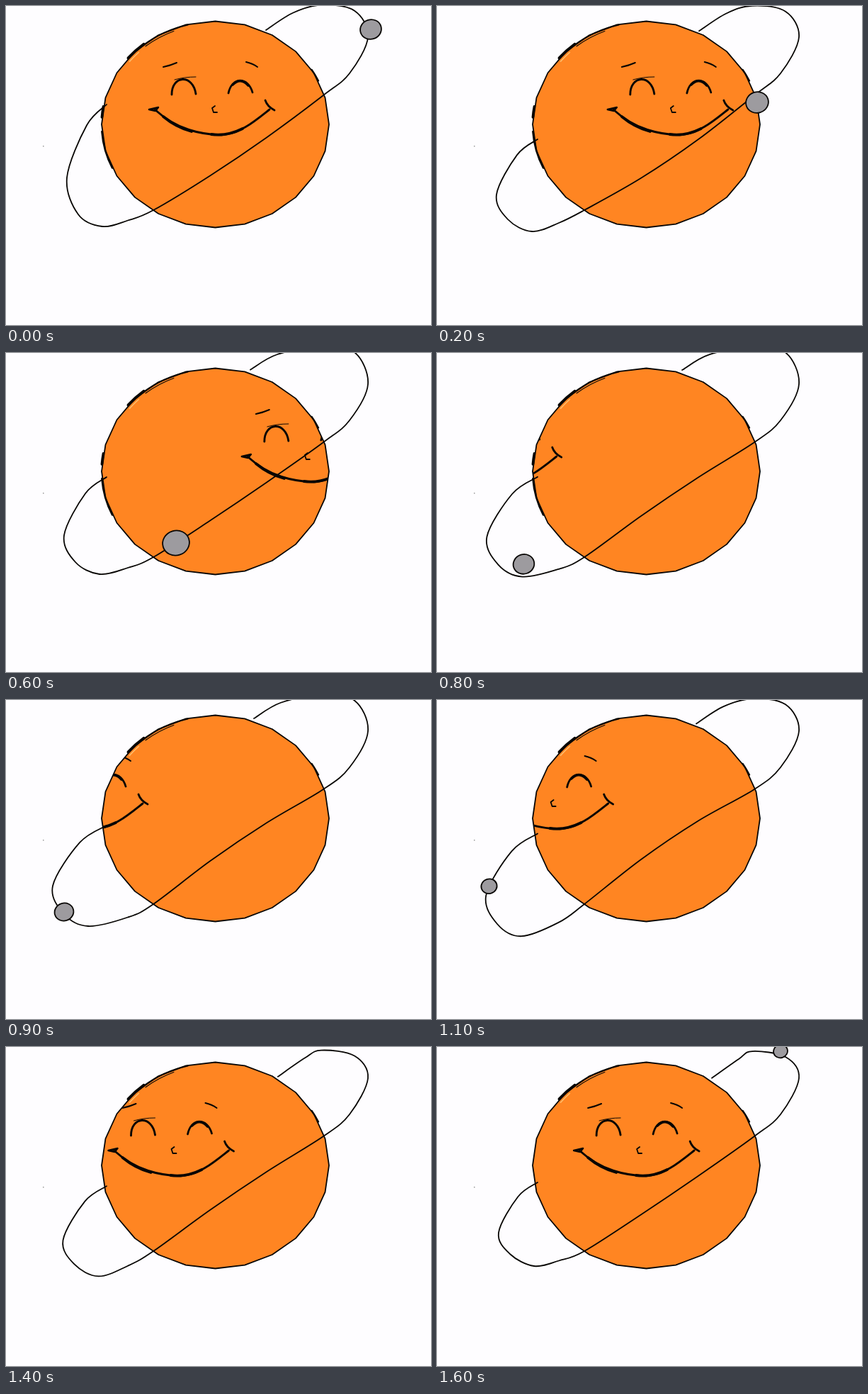
Write an HTML page with a canvas that moves like this. It is 600 px wide and 450 px high and loops after 1700 ms.

```html
<!DOCTYPE html>
<html lang="en">
<head>
<meta charset="utf-8">
<title>Smiling planet</title>
<style>
  html, body { margin: 0; height: 100%; overflow: hidden; background: #fefdff; }
  canvas { display: block; }
</style>
</head>
<body>
<canvas id="stage" width="600" height="450"></canvas>
<script>
const ctx = document.getElementById('stage').getContext('2d');
const STEP = 100, STEPS = 17, TAU = 2 * Math.PI;
const INK = '#080604', ORANGE = '#ff8522', GREY = '#9d9b9f';
const CX = 295.5, CY = 167, RX = 160.5, RY = 145.5;

// Key poses. Ring: start x, left edge, bottom, end y. Moon: x, y, radius.
const poses = [
  { at: 0, ring: [367, 86, 311, 139], moon: [515, 33, 15] },
  { at: 2, ring: [370, 84, 318, 188], moon: [452, 136, 16] },
  { at: 4, ring: [364, 76, 315, 187], moon: [341, 203, 30] },
  { at: 6, ring: [345, 82, 312, 175], moon: [240, 268, 19] },
  { at: 9, ring: [350, 66, 319, 177], moon: [82, 299, 13.5] },
  { at: 12, ring: [374, 73, 336, 193], moon: [117, 223, 10.5] },
  { at: 16, ring: [388, 87, 309, 191], moon: [485, 6, 10] }
];

const catmull = (a, b, c, d, t) =>
  b + t / 2 * (c - a + t * (2 * a - 5 * b + 4 * c - d + t * (3 * (b - c) + d - a)));

// Smooth value of a pose property, going round the loop.
function pose(name, step) {
  const n = poses.length;
  const k = poses.findLastIndex(p => p.at <= step);
  const next = k + 1 < n ? poses[k + 1].at : STEPS;
  const t = (step - poses[k].at) / (next - poses[k].at);
  const [a, b, c, d] = [-1, 0, 1, 2].map(i => poses[(k + i + n) % n][name]);
  return b.map((_, i) => catmull(a[i], b[i], c[i], d[i], t));
}

// Smooth curve through [x, y] points.
function curve(pts) {
  const at = i => pts[Math.max(0, Math.min(pts.length - 1, i))];
  const path = new Path2D();
  path.moveTo(...pts[0]);
  for (let i = 0; i < pts.length - 1; i++) {
    const [a, b, c, d] = [at(i - 1), at(i), at(i + 1), at(i + 2)];
    path.bezierCurveTo(b[0] + (c[0] - a[0]) / 6, b[1] + (c[1] - a[1]) / 6,
      c[0] - (d[0] - b[0]) / 6, c[1] - (d[1] - b[1]) / 6, c[0], c[1]);
  }
  return path;
}

function stroke(path, width = 1.8, color = INK) {
  ctx.lineWidth = width;
  ctx.strokeStyle = color;
  ctx.stroke(path);
}

function fill(path, color = INK) {
  ctx.fillStyle = color;
  ctx.fill(path);
}

// The outline is slightly angular, as if drawn in short strokes.
const planet = new Path2D();
for (let i = 0; i < 24; i++) {
  const a = i / 24 * TAU;
  planet.lineTo(CX + RX * Math.cos(a), CY + RY * Math.sin(a));
}
planet.closePath();

// Heavier stroke along the outline, between two angles in degrees.
function edgeMark(from, to, width, scale = 1, color = INK) {
  const arc = new Path2D();
  arc.ellipse(CX, CY, RX * scale, RY * scale, 0, from * TAU / 360, to * TAU / 360);
  stroke(arc, width, color);
}

const faceLines = [
  ['M222 86Q232 84 241 80', 2],
  ['M339 79Q348 81 355 86', 2.1],
  ['M234 125C234 97 264 96 268 124', 2.9],
  ['M238 104Q252 100 268 100', 1],
  ['M314 123C319 99 342 100 348 122', 2.8],
  ['M320 111Q331 100 342 112', 3.6],
  ['M295 141L291 144L293 150L298 150', 1.8],
  ['M210 146C242 175 275 181 304 182C330 181 353 161 372 146', 2.9],
  ['M222 156Q240 171 262 177M290 181Q312 184 334 173', 3.8],
  ['M366 133Q369 142 379 147', 2.8],
  ['M202 146L215 143L211 148Z', 2.5]
].map(([d, width]) => [new Path2D(d), width]);

// Face drifts right, then comes round from the left.
const faceShift = step => step < 8
  ? 18.2 * step + 0.6 * step * step
  : 24.3 * (step - 9) - 179;

function drawFace(step) {
  ctx.save();
  ctx.clip(planet);
  ctx.translate(faceShift(step), 0);
  faceLines.forEach(line => stroke(...line));
  ctx.restore();
}

function drawRing(step) {
  const [start, left, bottom, end] = pose('ring', step);
  const top = (start - 365) * 0.35 - 2;
  const sag = 9 * Math.cos((step - 2.5) / STEPS * TAU);
  const height = bottom - end;
  stroke(curve([
    [start, 33 + (start - 365) * 0.47], [start + 38, top + 11], [445, top], [492, top + 8],
    [511, 44], [485, 95], [448, 126],
    [368, 180 + sag], [288, 234 + sag], [208, 288],
    [172, (288 + bottom) / 2 + 3], [left + 50, bottom], [left + 16, bottom - 17],
    [left, bottom - height * 0.4], [(left + 142) / 2, end + height * 0.17], [142, end]
  ]));
}

function drawMoon(step) {
  const [x, y, r] = pose('moon', step);
  const disc = new Path2D();
  disc.ellipse(x, y, r, r * 0.92, -0.3, 0, TAU);
  fill(disc, GREY);
  stroke(disc);
}

function draw(step) {
  const behind = step > 12 && step < 16;
  ctx.clearRect(0, 0, 600, 450);
  fill(new Path2D('M52 197h1.5v1.5h-1.5Z'), '#999');
  if (behind) drawMoon(step);
  fill(planet, ORANGE);
  drawFace(step);
  stroke(planet);
  edgeMark(219, 226, 1.5, 0.97, '#ffc070');
  edgeMark(220, 231, 4);
  edgeMark(230, 256, 2, 0.995);
  edgeMark(231, 248, 1.2, 0.975);
  edgeMark(328, 335, 2.4);
  if (step < 9) {
    edgeMark(184, 190, 3.6);
    edgeMark(155, 176, 2.6);
  }
  drawRing(step);
  if (!behind) drawMoon(step);
}

ctx.lineCap = ctx.lineJoin = 'round';
const begin = performance.now();
function tick() {
  draw(Math.floor((performance.now() - begin) / STEP) % STEPS);
  requestAnimationFrame(tick);
}
tick();
</script>
</body>
</html>
```
